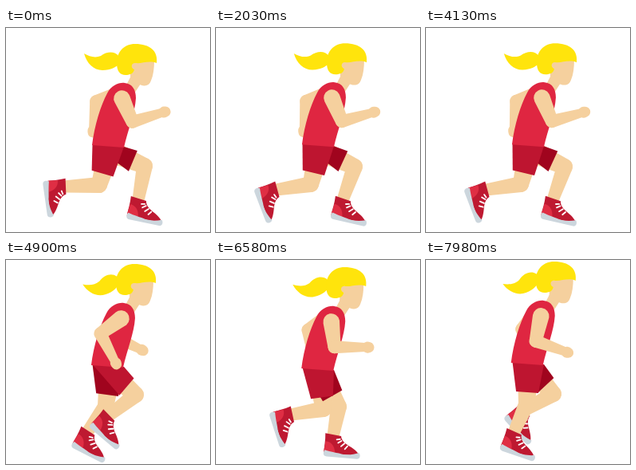
These frames come from a looping animation (256x256 px, 8000 ms). An HTML page with a canvas:

```html
<!DOCTYPE html>
<html lang="en">
<head>
<meta charset="utf-8">
<title>Runner</title>
<style>
html, body { margin: 0; width: 100%; height: 100%; overflow: hidden; background: #fff; }
canvas { display: block; width: 100vmin; height: 100vmin; }
</style>
</head>
<body>
<canvas id="stage"></canvas>
<script>
const canvas = document.getElementById('stage');
const ctx = canvas.getContext('2d');

const LOOP = 8000, STEP = 70, CYCLE = 30, HALF = CYCLE / 2;
const COLOR = {
  skin: '#f5d09e', hair: '#ffe40c', shirt: '#df2641', nearShorts: '#be1530',
  farShorts: '#a0041e', shoe: '#be1931', heel: '#df2e44', sole: '#ccd6dd', lace: '#fff'
};

// Stride of one leg: phase, knee x, knee y, ankle x, ankle y, shoe angle.
const STRIDE = [
  [0, 117, 197, 73, 199, 82],
  [4, 135, 187, 94, 194, 72],
  [5, 142, 181, 103, 190, 67],
  [9, 160, 168, 123, 189, 48],
  [10, 163, 169, 128, 196, 40],
  [14, 174, 174, 159, 216, 13],
  [15, 174, 173, 166, 216, 12],
  [19, 154, 184, 147, 221, 5],
  [20, 148, 180, 143, 219, 3],
  [24, 126, 181, 110, 217, 19],
  [25, 125, 184, 102, 216, 27],
  [29, 119, 196, 75, 203, 69]
];

const HEAD = {
  face: new Path2D('M156 44L186 41C186 50 185 59 182 66C179 74 172 74 164 69L156 64Z'),
  hair: new Path2D('M189 44C191 29 181 20 162 20C148 20 139 30 139 44C139 54 143 59 150 59C156 59 160 57 161 52C156 50 157 43 163 44C170 45 180 40 189 44Z'),
  tail: new Path2D('M142 36C137 29 127 29 119 35C112 38 105 36 98 32C101 44 110 53 121 53C132 53 138 49 142 45Z')
};
const SHIRT = new Path2D('M108 147C111 122 119 97 127 82C132 72 142 68 149 69C159 70 163 78 163 88C162 106 153 128 148 150Z');
const SHOE = {
  body: new Path2D('M-10 -3L10 -1C11 5 16 8 22 11C28 14 34 18 35 22L-10 22C-10 14 -9 6 -10 -3Z'),
  heel: new Path2D('M-9 7C-2 7 3 12 4 20L-10 20C-10 16 -9 12 -9 7Z'),
  sole: new Path2D('M-9 18C0 20 4 20 10 21C18 23 27 21 34 18C37 21 36 26 32 26L-6 26C-11 26 -11 21 -9 18Z'),
  laces: new Path2D('M5 4L9 3M7 8L11 5M11 12L15 8M16 15L19 11')
};

const rad = deg => deg * Math.PI / 180;
const mix = (a, b, k) => a + (b - a) * k;

function fill(path, color) {
  ctx.fillStyle = color;
  ctx.fill(path);
}

// Smooth periodic interpolation through the stride keys.
function leg(phase) {
  const p = phase % CYCLE, n = STRIDE.length;
  const key = i => {
    const [time, ...values] = STRIDE[(i + n) % n];
    return { time: time + CYCLE * Math.floor(i / n), values };
  };
  let i = 0;
  while (key(i + 1).time <= p) i++;
  const [a, b, c, d] = [i - 1, i, i + 1, i + 2].map(key);
  const span = c.time - b.time, u = (p - b.time) / span;
  return b.values.map((v, j) => {
    const end = c.values[j];
    const m0 = (end - a.values[j]) / (c.time - a.time) * span;
    const m1 = (d.values[j] - v) / (d.time - b.time) * span;
    const s = u * u * (3 - 2 * u);
    return mix(v, end, s) + u * (1 - u) * ((1 - u) * m0 - u * m1);
  });
}

// Tapered limb segment with round ends.
function limb(ax, ay, ra, bx, by, rb) {
  const dir = Math.atan2(by - ay, bx - ax);
  const side = Math.acos((ra - rb) / Math.hypot(bx - ax, by - ay));
  ctx.beginPath();
  ctx.arc(ax, ay, ra, dir + side, dir - side + 2 * Math.PI);
  ctx.arc(bx, by, rb, dir - side, dir + side);
  ctx.closePath();
  ctx.fillStyle = COLOR.skin;
  ctx.fill();
}

function drawShoe(x, y, angle) {
  ctx.save();
  ctx.translate(x, y);
  ctx.rotate(rad(angle));
  fill(SHOE.body, COLOR.shoe);
  fill(SHOE.heel, COLOR.heel);
  fill(SHOE.sole, COLOR.sole);
  ctx.strokeStyle = COLOR.lace;
  ctx.lineWidth = 1.8;
  ctx.lineCap = 'round';
  ctx.stroke(SHOE.laces);
  ctx.restore();
}

function drawLeg(phase, hipX, hipY) {
  const [kx, ky, ax, ay, angle] = leg(phase);
  limb(hipX, hipY, 14, kx, ky, 10);
  limb(kx, ky, 10, ax, ay, 7.5);
  drawShoe(ax, ay, angle);
}

function drawShorts(phase, hipX, hipY, color) {
  const [kx, ky] = leg(phase);
  const len = Math.hypot(kx - hipX, ky - hipY);
  const nx = (ky - hipY) / len * 14, ny = (hipX - kx) / len * 14;
  const hx = mix(hipX, kx, .66), hy = mix(hipY, ky, .66);
  ctx.beginPath();
  ctx.moveTo(108.5, hipY - 9);
  ctx.lineTo(hx - nx, hy - ny);
  ctx.lineTo(hx + nx, hy + ny);
  ctx.lineTo(148, hipY - 6);
  ctx.closePath();
  ctx.fillStyle = color;
  ctx.fill();
}

function drawArm(x, y, upper, upperLen, fore, foreLen) {
  const ex = x + upperLen * Math.sin(rad(upper)), ey = y + upperLen * Math.cos(rad(upper));
  const dx = Math.sin(rad(fore)), dy = Math.cos(rad(fore));
  const hx = ex + foreLen * dx, hy = ey + foreLen * dy;
  limb(x, y, 10.3, ex, ey, 8);
  limb(ex, ey, 8, hx - 5 * dx, hy - 5 * dy, 5.5);
  limb(hx - 2 * dx, hy - 2 * dy, 7, hx, hy, 6.5);
}

function lifted(rise, draw) {
  ctx.save();
  ctx.translate(-rise * .07, -rise);
  draw();
  ctx.restore();
}

function drawHead(rise) {
  ctx.save();
  ctx.translate(140, 41);
  ctx.rotate(rad(-1.2 * rise));
  ctx.translate(-140, -41);
  fill(HEAD.tail, COLOR.hair);
  ctx.restore();
  fill(HEAD.face, COLOR.skin);
  fill(HEAD.hair, COLOR.hair);
}

function drawRunner(phase) {
  const rise = 10 - 10 * Math.cos(2 * Math.PI * phase / HALF);
  const swing = Math.cos(2 * Math.PI * phase / CYCLE);
  const far = [phase + HALF, 131, 155 - rise];
  const near = [phase, 129, 155 - rise];

  lifted(rise, () => drawArm(140, 84, -27 - 46 * swing, 28, 41 - 47 * swing, 39));
  drawLeg(...far);
  drawLeg(...near);
  drawShorts(...far, COLOR.farShorts);
  drawShorts(...near, COLOR.nearShorts);
  lifted(rise, () => {
    limb(166, 60, 8, 156, 77, 7);
    fill(SHIRT, COLOR.shirt);
    drawHead(rise);
    drawArm(145.5, 88.5, -28 + 52 * swing, 32, 54 + 53 * swing, 43.5);
  });
}

function resize() {
  const size = Math.round(Math.min(innerWidth, innerHeight) * devicePixelRatio);
  if (canvas.width !== size) canvas.width = canvas.height = size;
}

function render() {
  resize();
  const scale = canvas.width / 256;
  ctx.setTransform(scale, 0, 0, scale, 0, 0);
  ctx.fillStyle = '#fff';
  ctx.fillRect(0, 0, 256, 256);
  drawRunner(Math.floor(performance.now() % LOOP / STEP) % CYCLE);
  requestAnimationFrame(render);
}
render();
</script>
</body>
</html>
```
